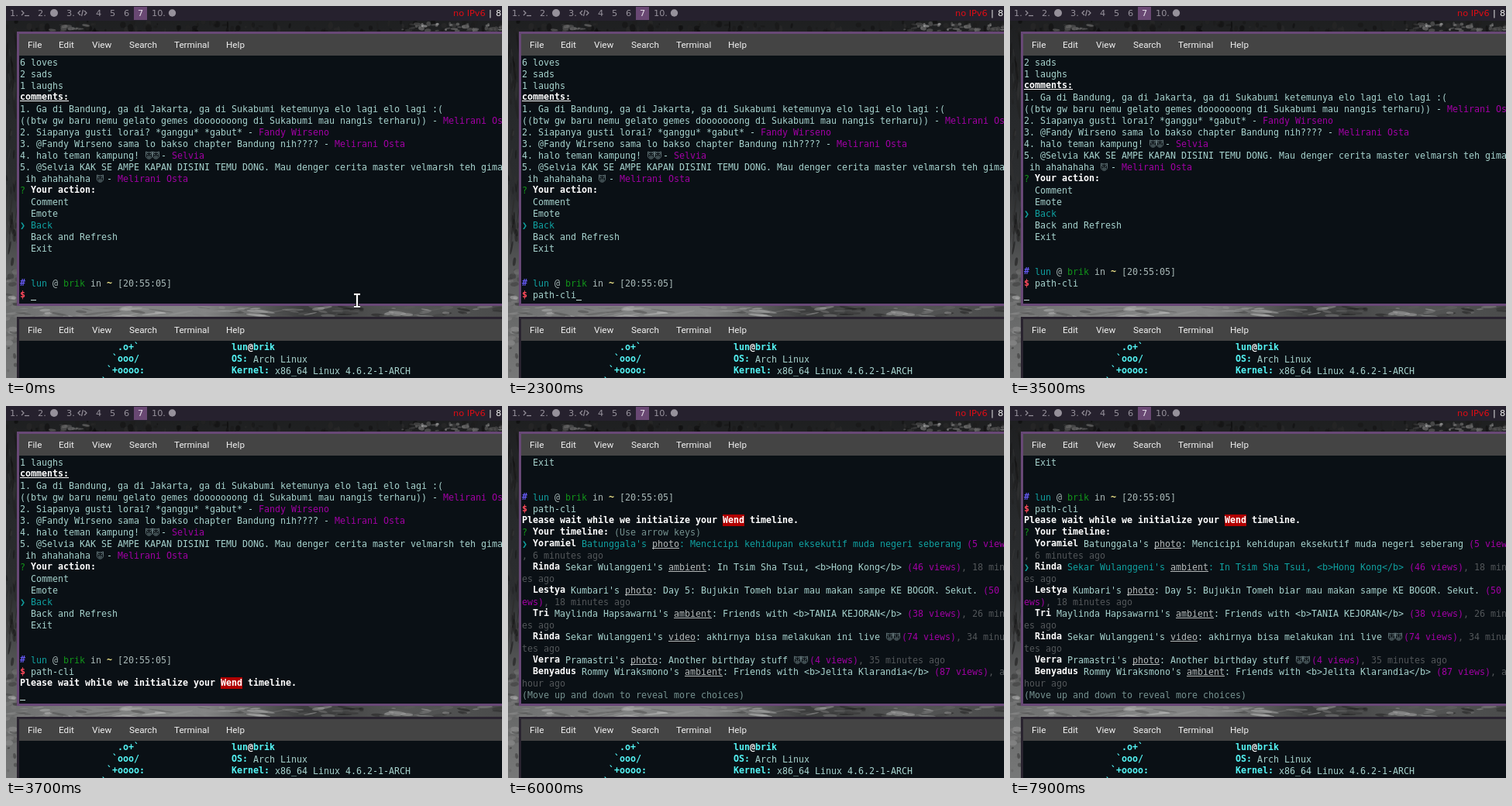
Recreate the animation shown at these times as an HTML page with a canvas. Size 640 by 480 pixels, loop 8 s.

```html
<!DOCTYPE html>
<html lang="id">
<head>
<meta charset="utf-8">
<title>Terminal session</title>
<style>
html, body { margin: 0; width: 100%; height: 100%; overflow: hidden; background: #1a1a1a; }
canvas { display: block; width: 640px; height: 480px; }
</style>
</head>
<body>
<canvas id="stage" width="640" height="480"></canvas>
<script>
const LOOP = 8000, CELL = 7, ROW = 15, LEFT = 18, ROWS = 21;
const KEYS = [600, 800, 1000, 1200, 1500, 1750, 2000, 2200];
const ENTER = 3500, WAIT = 3700, LIST = 6000, MOVE = 7400;
const COMMAND = 'path-cli';
const MONO = '11.63px "DejaVu Sans Mono", monospace';
const SANS = '11.3px "DejaVu Sans", sans-serif';
const MENU = '11.7px Roboto, sans-serif';

// Style letters used after § in terminal lines.
const STYLES = {
  n: { color: '#a6d2cd' },
  w: { color: '#ffffff', bold: true },
  u: { color: '#ffffff', bold: true, line: true },
  k: { color: '#b4b8b8', line: true },
  t: { color: '#10a0a0' },
  g: { color: '#12941a' },
  m: { color: '#a000a4' },
  d: { color: '#525659' },
  h: { color: '#75918f' },
  p: { color: '#a9b9b8' },
  b: { color: '#6458f0', bold: true },
  r: { color: '#ff4a5c', bold: true },
  y: { color: '#f0e68a', bold: true },
  c: { color: '#54f4f4', bold: true },
  R: { color: '#ffffff', bold: true, back: '#b00000' },
  e: { color: '#66797c', faces: true }
};

const SESSION = [
  '6 loves',
  '2 sads',
  '1 laughs',
  '§ucomments:',
  '1. Ga di Bandung, ga di Jakarta, ga di Sukabumi ketemunya elo lagi elo lagi :(',
  '((btw gw baru nemu gelato gemes dooooooong di Sukabumi mau nangis terharu)) - §mMelirani Osta',
  '2. Siapanya gusti lorai? *ganggu* *gabut* - §mFandy Wirseno',
  '3. @Fandy Wirseno sama lo bakso chapter Bandung nih???? - §mMelirani Osta',
  '4. halo teman kampung! §e::§n - §mSelvia',
  '5. @Selvia KAK SE AMPE KAPAN DISINI TEMU DONG. Mau denger cerita master velmarsh teh gimana',
  ' ih ahahahaha §e:§n - §mMelirani Osta',
  '§g? §wYour action:',
  '  Comment',
  '  Emote',
  '§t❯ Back',
  '  Back and Refresh',
  '  Exit',
  '',
  '',
  '§b# §tlun §p@ §gbrik §pin §y~ §p[20:55:05]'
];
const NOTICE = '§wPlease wait while we initialize your §RWend§w timeline.';

// name, owner, kind, text, views, age, wrapped remainder
const POSTS = [
  ['Yoramiel', 'Batunggala', 'photo', 'Mencicipi kehidupan eksekutif muda negeri seberang', '(5 views)', '', '§d, 6 minutes ago'],
  ['Rinda', 'Sekar Wulanggeni', 'ambient', 'In Tsim Sha Tsui, <b>Hong Kong</b>', '(46 views)', ', 18 minut', '§des ago'],
  ['Lestya', 'Kumbari', 'photo', 'Day 5: Bujukin Tomeh biar mau makan sampe KE BOGOR. Sekut.', '(50 vi', '', '§mews)§d, 18 minutes ago'],
  ['Tri', 'Maylinda Hapsawarni', 'ambient', 'Friends with <b>TANIA KEJORAN</b>', '(38 views)', ', 26 minut', '§des ago'],
  ['Rinda', 'Sekar Wulanggeni', 'video', 'akhirnya bisa melakukan ini live §e::', '(74 views)', ', 34 minu', '§dtes ago'],
  ['Verra', 'Pramastri', 'photo', 'Another birthday stuff §e::', '(4 views)', ', 35 minutes ago'],
  ['Benyadus', 'Rommy Wiraksmono', 'ambient', 'Friends with <b>Jelita Klarandia</b>', '(87 views)', ', an', '§dhour ago']
];

const stage = document.getElementById('stage').getContext('2d');

function rect(ctx, color, x, y, w, h) {
  ctx.fillStyle = color;
  ctx.fillRect(x, y, w, h);
}

function label(ctx, text, x, y, color, font) {
  ctx.font = font;
  ctx.fillStyle = color;
  ctx.fillText(text, x, y);
}

function stroke(ctx, color, width, points) {
  ctx.strokeStyle = color;
  ctx.lineWidth = width;
  ctx.beginPath();
  points.forEach(([x, y]) => ctx.lineTo(x, y));
  ctx.stroke();
}

function disc(ctx, color, x, y, r) {
  ctx.fillStyle = color;
  ctx.beginPath();
  ctx.arc(x, y, r, 0, 7);
  ctx.fill();
}

function face(ctx, x, y, color) {
  ctx.strokeStyle = color;
  ctx.lineWidth = 0.9;
  ctx.beginPath();
  ctx.arc(x, y, 4.2, 0, 7);
  ctx.moveTo(x + 2, y + 1);
  ctx.arc(x, y + 1, 2, 0, Math.PI);
  ctx.closePath();
  ctx.stroke();
  for (const side of [-1, 1]) {
    rect(ctx, color, x + side * 1.7 - 0.7, y - 2, 1.4, 1.4);
    stroke(ctx, color, 0.9, [[x + side * 4, y - 1], [x + side * 4, y - 5], [x + side, y - 4]]);
  }
}

// Bold glyphs sit one pixel higher than regular ones.
function termLine(ctx, source, x, baseline) {
  const parts = ('§n' + source).split(/§(.)/).slice(1);
  for (let i = 0; i < parts.length; i += 2) {
    const style = STYLES[parts[i]], text = parts[i + 1], width = text.length * CELL;
    const y = baseline - (style.bold ? 1 : 0);
    if (style.faces) {
      [...text].forEach((_, n) => face(ctx, x + 5.5 + n * 9, y - 4, style.color));
    } else {
      if (style.back) rect(ctx, style.back, x, baseline - 12, width, ROW);
      label(ctx, text, x, y, style.color, (style.bold ? 'bold ' : '') + MONO);
      if (style.line) rect(ctx, style.color, x, y + 1, width, 1);
    }
    x += width;
  }
}

function windowFrame(ctx, top, bottom, border) {
  rect(ctx, border, 14, top, 626, bottom - top);
  rect(ctx, '#0a1015', 17, top + 3, 623, bottom - top - 6);
  rect(ctx, '#444444', 17, top + 3, 623, 28);
  const items = { File: 28, Edit: 68, View: 111, Search: 159, Terminal: 217, Help: 284 };
  for (const [text, x] of Object.entries(items)) label(ctx, text, x, top + 21, '#f0f0f0', MENU);
}

function forest(ctx) {
  let seed = 11;
  const random = () => (seed = seed * 16807 % 2147483647) / 2147483647;
  const scatter = (count, x, y, w, h, size, low, high) => {
    for (let i = 0; i < count; i++) {
      const v = Math.round(low + random() * (high - low));
      ctx.fillStyle = `rgba(${v},${v},${v},0.55)`;
      ctx.beginPath();
      ctx.ellipse(x + random() * w, y + random() * h, size[0] * (0.3 + random()),
        size[1] * (0.3 + random()), random() * 0.4 - 0.2, 0, 7);
      ctx.fill();
    }
  };
  const gradient = (x, y, colors) => {
    const fill = ctx.createLinearGradient(0, 0, x, y);
    colors.forEach((color, i) => fill.addColorStop(i / (colors.length - 1), color));
    return fill;
  };
  rect(ctx, gradient(0, 480, ['#1d1e1f', '#26282a', '#2c2e30', '#606161', '#777878']), 0, 0, 640, 480);
  rect(ctx, gradient(640, 0, ['#6c6d6d', '#808181', '#838484', '#3c3d3d', '#555656', '#4a4b4b']), 0, 387, 640, 14);
  scatter(120, 0, 20, 640, 14, [3, 4], 8, 45);
  scatter(16, 55, 24, 55, 9, [4, 2], 60, 130);
  scatter(45, 510, 23, 130, 10, [4, 2.5], 60, 190);
  scatter(50, 0, 30, 14, 300, [1.5, 12], 12, 62);
  scatter(70, 0, 389, 400, 12, [14, 1.5], 70, 190);
  scatter(45, 400, 388, 240, 12, [9, 1.8], 20, 170);
  scatter(35, 0, 340, 14, 140, [5, 3], 45, 180);
}

function topBar(ctx) {
  const grey = '#96919b';
  rect(ctx, '#26212e', 0, 0, 640, 19);
  rect(ctx, '#694873', 165, 1, 17, 17);
  const items = { '1.': 5, '2.': 41, '3.': 78, '4': 116, '5': 134, '6': 152, '10.': 188 };
  for (const [text, x] of Object.entries(items)) label(ctx, text, x, 13, grey, SANS);
  label(ctx, '7', 170, 13, '#e6dfe9', SANS);
  stroke(ctx, grey, 1.2, [[20, 6], [23, 9], [20, 12]]);
  stroke(ctx, grey, 1.2, [[24, 12.5], [30, 12.5]]);
  stroke(ctx, grey, 1.2, [[96, 6], [93, 9], [96, 12]]);
  stroke(ctx, grey, 1.2, [[99.5, 5], [97.5, 13]]);
  stroke(ctx, grey, 1.2, [[101, 6], [104, 9], [101, 12]]);
  disc(ctx, grey, 62, 9, 5);
  disc(ctx, grey, 214.5, 9, 4.7);
  label(ctx, 'no IPv6', 577, 13, '#e00c14', SANS);
  label(ctx, '|', 623, 13, '#f0f0f0', SANS);
  label(ctx, '8', 632, 13, '#f0f0f0', SANS);
}

function makeDesktop() {
  const layer = document.createElement('canvas');
  layer.width = 640;
  layer.height = 480;
  const ctx = layer.getContext('2d');
  forest(ctx);
  topBar(ctx);
  windowFrame(ctx, 33, 387, '#684876');
  windowFrame(ctx, 401, 490, '#29232f');
  const logo = ['.o+`', '`ooo/', '`+oooo:', '`+oooooo:'];
  logo.forEach((text, i) => termLine(ctx, '§c' + text, LEFT + (18 - i) * CELL, 445 + i * ROW));
  const info = ['§clun§w@§cbrik', '§cOS:§n Arch Linux', '§cKernel:§n x86_64 Linux 4.6.2-1-ARCH'];
  info.forEach((text, i) => termLine(ctx, text, 291, 445 + i * ROW));
  return layer;
}

function postLines([name, owner, kind, text, views, age, rest], selected) {
  const tone = selected ? '§t' : '§n';
  const head = `${selected ? '§t❯ ' : '  '}§w${name}${tone} ${owner}'s §k${kind}${tone}: ${text}${tone} §m${views}§d${age}`;
  return rest ? [head, rest] : [head];
}

function pointer(x, y) {
  for (const [color, width] of [['#222222', 4], ['#ffffff', 2]]) {
    stroke(stage, color, width, [[x, y - 8], [x, y + 8]]);
    for (const end of [-8, 8]) stroke(stage, color, width, [[x - 4, y + end], [x + 4, y + end]]);
  }
}

function draw(t) {
  const pressed = KEYS.filter(key => key <= t);
  const typed = COMMAND.slice(0, pressed.length);
  const lines = [...SESSION, '§r$ §n' + typed];
  if (t >= WAIT) lines.push(NOTICE);
  if (t >= LIST) {
    const chosen = t < MOVE ? 0 : 1;
    lines.push('§g? §wYour timeline:' + (chosen ? '' : '§h (Use arrow keys)'));
    POSTS.forEach((post, i) => lines.push(...postLines(post, i === chosen)));
    lines.push('§h(Move up and down to reveal more choices)');
  } else if (t >= ENTER) {
    lines.push('');
  }

  stage.drawImage(desktop, 0, 0);
  lines.slice(-ROWS).forEach((line, row) => termLine(stage, line, LEFT, 77 + row * ROW));

  const lastKey = t >= ENTER ? ENTER : pressed.at(-1) || 0;
  const blinkOn = (t - lastKey) % 1200 < 600;
  if (t < LIST && blinkOn) {
    const column = t >= ENTER ? 0 : 2 + typed.length;
    rect(stage, '#c4dedb', LEFT + column * CELL, 379, CELL, 1);
  }
  if (t < KEYS[0]) pointer(453, 380);
}

const desktop = makeDesktop();
function tick() {
  draw(performance.now() % LOOP);
  requestAnimationFrame(tick);
}
tick();
</script>
</body>
</html>
```
